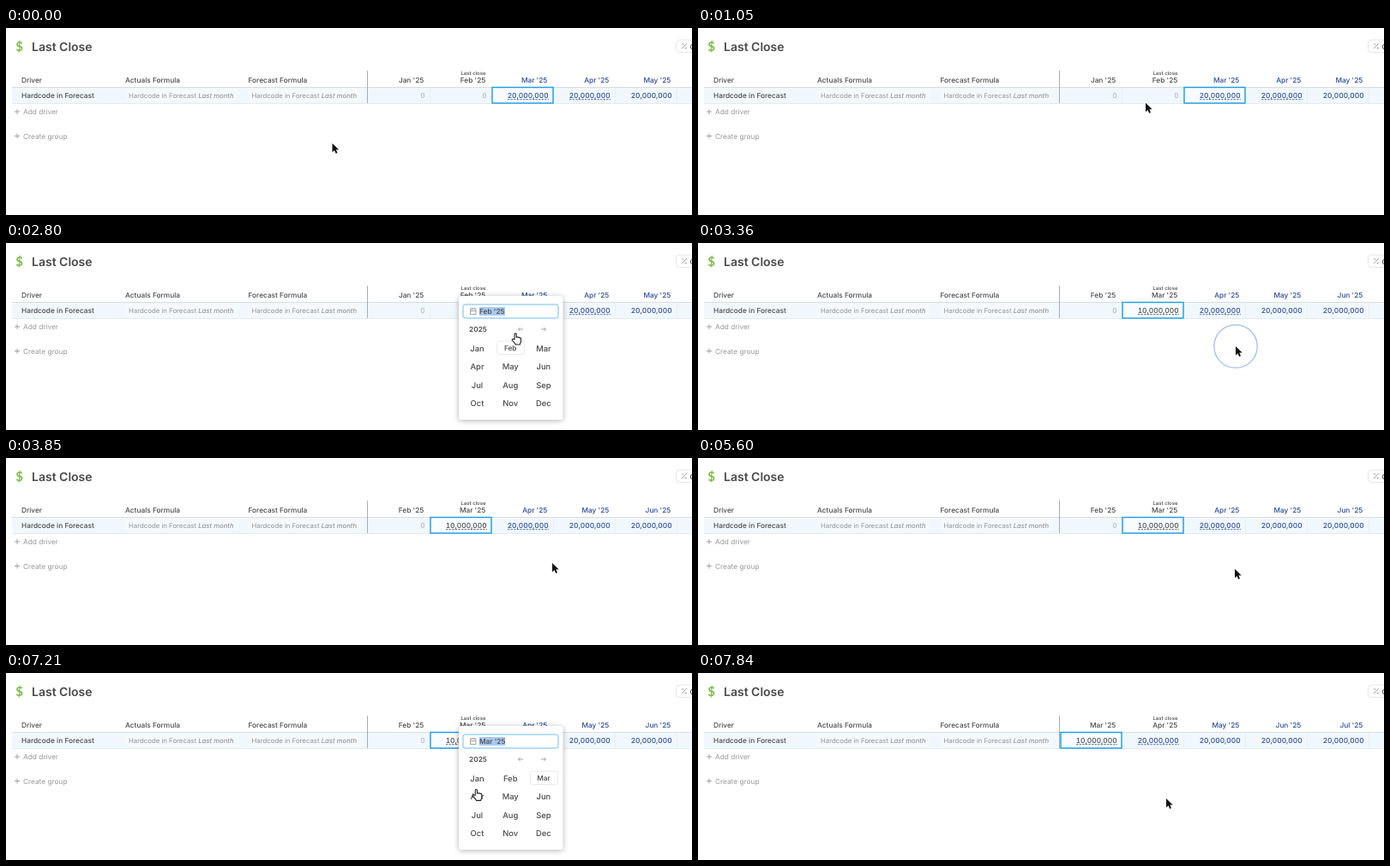
An HTML page that plays this animation: 800x219 px, repeating every 8 s.

```html
<!DOCTYPE html>
<html lang="en">
<head>
<meta charset="utf-8">
<title>Last Close</title>
<style>
html, body { margin: 0; width: 100%; height: 100%; overflow: hidden; background: #fff; }
svg { display: block; width: 800px; height: 219px; }
text { font: 500 8.3px Inter, "Open Sans", sans-serif; fill: #4a4a4a; text-rendering: geometricPrecision; }
.title { font-size: 14px; font-weight: 600; }
.dollar { font: 700 15px Lato, sans-serif; fill: #79bb45; text-anchor: middle; }
.hint { font-size: 7.8px; font-weight: 400; fill: #949494; }
.hint tspan { font-style: italic; fill: #858585; }
.add { fill: #9a9a9a; font-weight: 400; }
.end { text-anchor: end; }
.num { text-anchor: end; font-size: 8.4px; font-variant-numeric: tabular-nums; }
.close { font-size: 6px; text-anchor: end; }
.month { font-size: 9.4px; text-anchor: middle; }
.picked { font-size: 8.3px; text-anchor: middle; }
.blue { fill: #2d4a9a; }
.zero { fill: #9fb1c9; font-weight: 400; }
.icon { fill: none; stroke: #999; stroke-width: .9; }
#popup { filter: drop-shadow(0 1px 3px rgba(0, 0, 0, .3)); }
</style>
</head>
<body>
<svg viewBox="0 0 800 219">
  <text class="dollar" x="15.5" y="27">$</text>
  <text class="title" x="30" y="26.800">Last Close</text>
  <rect x="781.5" y="14" width="40" height="14.500" rx="4" fill="#fff" stroke="#e6e6e6"/>
  <path class="icon" d="M788 24L794 18M788 19h2.500M791.500 23.500h2.500"/>
  <text x="797.500" y="24.500">Customize</text>

  <text x="18" y="63.700">Driver</text>
  <text x="139" y="63.700">Actuals Formula</text>
  <text x="282.500" y="63.700">Forecast Formula</text>
  <path id="back" class="icon" d="M125 60.500h-5.500m2-2l-2 2l2 2" stroke-opacity=".8"/>

  <rect x="7" y="69" width="793" height="19" fill="#f1f8fd"/>
  <path d="M7 69.500H800" stroke="#d9dcdf"/>
  <path d="M7 88.500H800" stroke="#e3ebf1"/>
  <path d="M494.500 70v18M566.500 70v18M638.500 70v18M710.500 70v18M782.500 70v18" stroke="#e8f0f6"/>
  <path d="M421.500 50V88" stroke="#a9adb1"/>
  <path d="M139 72h131v14h-131zM283 72h131v14h-131z" fill="#f5f9fc"/>
  <text x="18" y="81.800">Hardcode in Forecast</text>
  <text class="hint" x="143" y="81.800">Hardcode in Forecast <tspan>Last month</tspan></text>
  <text class="hint" x="286.500" y="81.800">Hardcode in Forecast <tspan>Last month</tspan></text>
  <g id="table"></g>

  <path class="icon" d="M10 98h6m-3-3v6M10 126.500h6m-3-3v6"/>
  <text class="add" x="20" y="101">Add driver</text>
  <text class="add" x="20" y="129.500">Create group</text>

  <g id="popup">
    <rect x="528" y="62" width="121.500" height="145" rx="3.500" fill="#fff"/>
    <g id="content">
      <rect x="533" y="72" width="111" height="16" rx="2.500" fill="#fff" stroke="#6dbde9"/>
      <path class="icon" d="M541.500 77h6.500v6.500h-6.500zM541.500 79.500h6.500M543.500 75.800v2M546 75.800v2"/>
      <rect x="552" y="75" width="30" height="10" fill="#a9c9ee"/>
      <path class="icon" d="M603 101h-5.500m2.200-2.200l-2.200 2.200l2.200 2.200M624 101h5.500m-2.200-2.200l2.200 2.200l-2.200 2.200"/>
      <text x="540" y="104.200" style="font-weight:600">2025</text>
      <g id="months"></g>
    </g>
  </g>

  <circle id="ripple" fill="#fff" fill-opacity=".25" stroke="#5f8be2"/>
  <g id="pointer" stroke-linejoin="round">
    <path id="arrow" d="M0 0V10.500L2.500 8.200L4.200 12L6 11.200L4.400 7.500H7.700Z" fill="#111" stroke="#fff" stroke-width=".9" paint-order="stroke"/>
    <path id="hand" d="M-1 7V1a1.100 1.100 0 0 1 2.200 0V4.500c.4-.7 1.700-.6 1.900.2c.5-.6 1.600-.4 1.800.4c.7-.4 1.600 0 1.600 1V9c0 1.600-1 2.200-1.200 4H.2C0 11.500-2 10-3.600 8c-.8-1 .5-2 1.300-1.400Z" fill="#fff" stroke="#222" stroke-width="1.100"/>
  </g>
</svg>
<script>
const LOOP = 8000;
const MONTHS = 'Jan Feb Mar Apr May Jun Jul Aug Sep Oct Nov Dec'.split(' ');
const MAR = 2;
const el = id => document.getElementById(id);
const show = (id, on) => el(id).style.display = on ? '' : 'none';
const text = (cls, x, y, s) => `<text class="${cls}" x="${x}" y="${y}">${s}</text>`;

// Pointer stops: time, x, y
const path = [
  [0, 380.5, 135], [70, 380.5, 135], [875, 505, 114], [1260, 544, 54],
  [1960, 544, 54], [2170, 556, 72], [2590, 556, 72], [2800, 594, 106],
  [3080, 627, 121], [3430, 627, 121], [3850, 637, 123], [4060, 637, 123],
  [4480, 630, 131], [5040, 630, 131], [5250, 626, 130], [5600, 626, 130],
  [6300, 539, 51.5], [6860, 539, 51.5], [7280, 549, 143], [7560, 549, 143],
  [7840, 546, 147], [LOOP, 546, 147]
];
const clicks = [1470, 3150, 6370, 7490];
const opens = [[1610, 3360], [6440, 7630]];

function pointerAt(t) {
  const i = path.findIndex(p => p[0] > t);
  const [t0, x0, y0] = path[i - 1], [t1, x1, y1] = path[i];
  const u = (t - t0) / (t1 - t0), k = u * u * (3 - 2 * u);
  return [x0 + (x1 - x0) * k, y0 + (y1 - y0) * k];
}

// shift counts how many months the last close has moved on
function drawTable(shift) {
  const close = 1 + shift;
  let out = text('close', 559.5, 54.6, 'Last close');
  for (let c = 0; c < 5; c++) {
    const m = shift + c, right = 488 + 72 * c;
    const value = m < MAR ? '0' : m === MAR && shift ? '10,000,000' : '20,000,000';
    const tint = m < MAR ? 'zero' : m === MAR && shift ? '' : 'blue';
    out += text('end ' + (m > close ? 'blue' : ''), right - .7, 63.7, MONTHS[m] + " '25");
    if (m === MAR) out += `<rect x="${right - 65}" y="69.500" width="71" height="18.500" fill="#f8fcff" stroke="#1b9ce5" stroke-width="1.400"/>`;
    out += text('num ' + tint, right + .6, 81.8, value);
    if (m === MAR || m === MAR + 1)
      out += `<path d="M${right - 47} 83.700h48" stroke="${tint ? '#4a66a8' : '#555'}" stroke-width=".9" stroke-dasharray="2.400 1.200"/>`;
  }
  el('table').innerHTML = out;
}

function drawMonths(shift) {
  const picked = 1 + shift;
  el('months').innerHTML = text('', 552, 83, MONTHS[picked] + " '25") + MONTHS.map((name, i) => {
    const x = 549.5 + 38.7 * (i % 3), y = 127.2 + 21.2 * Math.floor(i / 3);
    return i === picked
      ? `<rect x="${x - 15.5}" y="115" width="32" height="15.500" rx="3" fill="#fff" stroke="#e9e9e9"/>` + text('picked', x, y - 1.5, name)
      : text('month', x, y, name);
  }).join('');
}

let drawn = -1;
function render(t) {
  const shift = opens.filter(o => t >= o[1]).length;
  if (shift !== drawn) {
    drawTable(shift);
    drawMonths(shift);
    drawn = shift;
  }
  const open = opens.find(([a, b]) => t >= a && t < b);
  const [x, y] = pointerAt(t);
  const hand = open || y < 68;
  show('popup', open);
  if (open) el('content').setAttribute('opacity', Math.min(1, .5 + (t - open[0]) / 240));
  show('back', y < 68);
  show('hand', hand);
  show('arrow', !hand);
  el('pointer').setAttribute('transform', `translate(${x} ${y})`);

  const age = t - clicks.findLast(c => c <= t);
  const on = age < 350;
  show('ripple', on);
  if (on) {
    const fade = 1 - age / 350;
    const attrs = {
      cx: x, cy: y, r: 30 * (1 - Math.exp(-age / 115)),
      'stroke-opacity': Math.min(1, 1.5 * fade), 'stroke-width': .2 + 2.6 * fade
    };
    for (const k in attrs) el('ripple').setAttribute(k, attrs[k]);
  }
}

const start = performance.now();
function tick() {
  render((performance.now() - start) % LOOP);
  requestAnimationFrame(tick);
}
tick();
</script>
</body>
</html>
```
